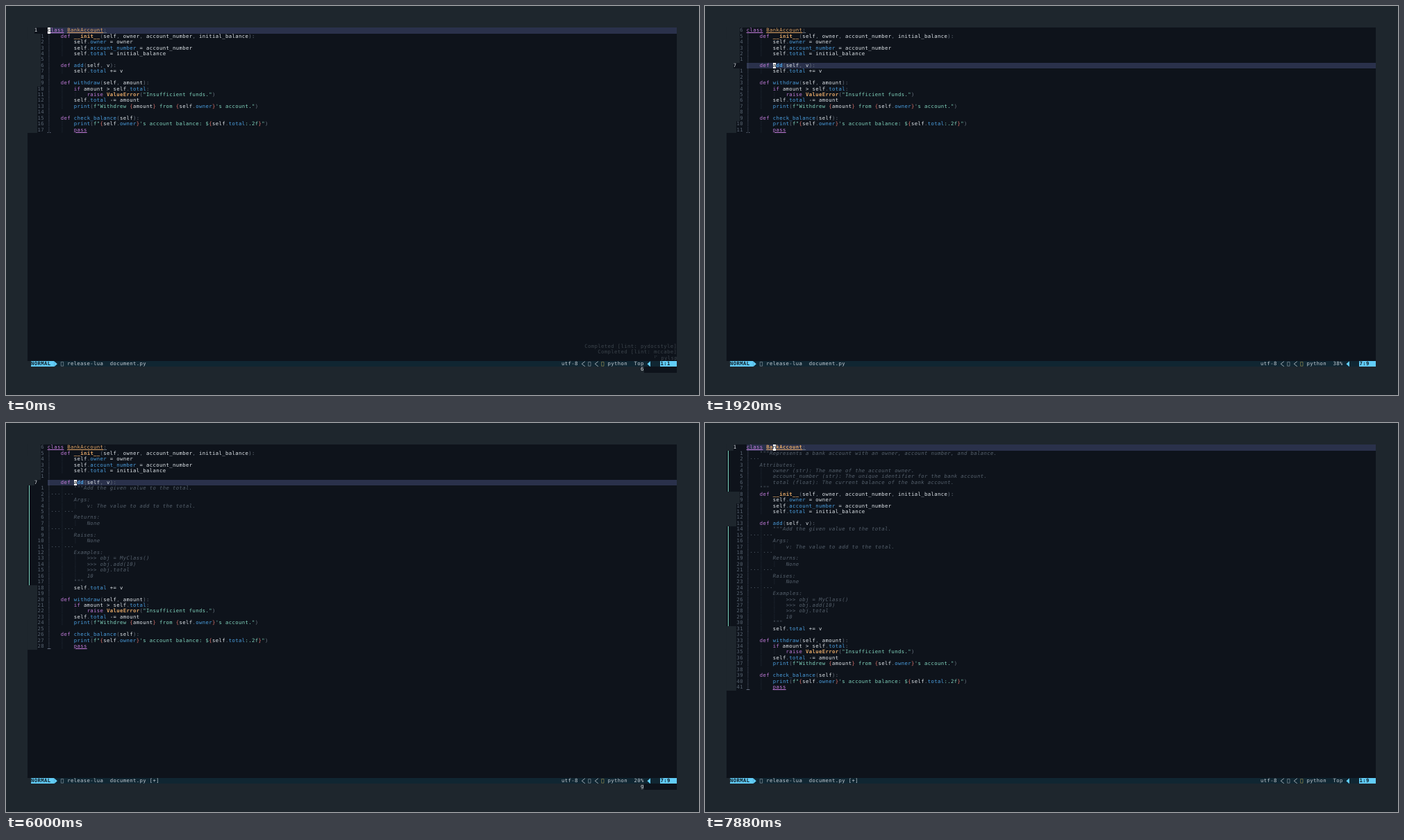
Animation of 998x561 px, one loop 8000 ms. Source, as an HTML page:

```html
<!DOCTYPE html>
<html lang="en">
<head>
<meta charset="utf-8">
<title>Editor session</title>
<style>
html, body { margin: 0; width: 100%; height: 100%; overflow: hidden; background: #1e262d; }
#stage {
  position: relative; width: 998px; height: 561px; overflow: hidden;
  font: 7.25px/8.435px "DejaVu Sans Mono", monospace; letter-spacing: .3813px;
  font-variant-ligatures: none; text-rendering: geometricPrecision; color: #dfe5ea;
  transform: rotate(.001deg); /* keeps baselines and edges on fractional pixels */
}
#stage span, #stage div, #stage svg { position: absolute; white-space: pre; }
#stage svg { left: 0; top: 0; fill: none; }
.bg { background: #0e131b; }
.out { background: #1e262d; }
.line { background: #2a314b; }
.kw { color: #c07bd8; }
.ty { color: #e0a566; }
.bold { font-weight: 700; }
.fn { color: #4b9fe0; }
.pun { color: #69737f; }
.brace { color: #d9736b; }
.str { color: #80d3bd; }
.doc { color: #55606c; font-style: italic; }
.num { color: #596572; }
.guide { color: #2b343f; }
.scope { color: #626a7c; }
.u { text-decoration: underline; text-decoration-thickness: .7px; text-underline-offset: 1px; }
.ref { font-weight: 700; background: color-mix(in srgb, currentColor 28%, #0e131b); }
.cur { background: #fff; color: #0e131b; }
.note { color: #3b434b; }
.sign { background: #7fd6c0; }
.bar { background: #102632; }
.stat { color: #c3ccd4; }
.normal { background: #62cdf8; }
.insert { background: #8be3bd; }
.mode { color: #0e1a22; font-weight: 700; }
.title { color: #d4746a; }
.pick { background: #283041; }
.item { color: #bac3cd; }
.caret { background: #dfe5ea; }
</style>
</head>
<body>
<div id="stage"></div>
<script>
const W = 4.746, H = 8.435, X0 = 31.2, Y0 = 31.2, COLS = 197, LOOP = 8000;
const stage = document.getElementById('stage');
let html = '';

const px = col => X0 + col * W;
const py = row => Y0 + row * H;
const rect = (x, y, w, h, cls, extra = '') => {
  html += `<div class="${cls}" style="left:${x}px;top:${y}px;width:${w}px;height:${h}px;${extra}"></div>`;
};
const fill = (row, col, cols, cls, rows = 1, extra) =>
  rect(px(col), py(row), cols * W, rows * H, cls, extra);
const put = (row, col, text, cls = '') => {
  html += `<span class="${cls}" style="left:${px(col)}px;top:${py(row)}px">${text}</span>`;
};
const outline = (shapes, color, width) => {
  html += `<svg width="998" height="561" stroke="${color}" stroke-width="${width}">${shapes}</svg>`;
};

const base = `class BankAccount:
    def __init__(self, owner, account_number, initial_balance):
        self.owner = owner
        self.account_number = account_number
        self.total = initial_balance

    def add(self, v):
        self.total += v

    def withdraw(self, amount):
        if amount > self.total:
            raise ValueError("Insufficient funds.")
        self.total -= amount
        print(f"Withdrew {amount} from {self.owner}'s account.")

    def check_balance(self):
        print(f"{self.owner}'s account balance: \${self.total:.2f}")
        pass`.split('\n');

// Docstring lines carry a leading "~"
const docLines = (indent, text) =>
  text.split('\n').map(s => '~' + ' '.repeat(indent) + s);
const addDoc = docLines(8, `"""Add the given value to the total.

Args:
    v: The value to add to the total.

Returns:
    None

Raises:
    None

Examples:
    >>> obj = MyClass()
    >>> obj.add(10)
    >>> obj.total
    10
"""`);
const classDoc = docLines(4, `"""Represents a bank account with an owner, account number, and balance.

Attributes:
    owner (str): The name of the account owner.
    account_number (str): The unique identifier for the bank account.
    total (float): The current balance of the bank account.
"""`);
const withAdd = [...base.slice(0, 7), ...addDoc, ...base.slice(7)];
const withBoth = [withAdd[0], ...classDoc, ...withAdd.slice(1)];
const buffers = [base, withAdd, withBoth];

const functionActions = ['Answer Question', 'Complete Code', 'Update Class Docstring',
  'Update Function Docstring', 'Explain Code', 'Update Function Args Type Annotations',
  'Update Function Docstring With Class Context', 'Review Code', 'Write Tests'];
const classActions = ['Answer Question', 'Complete Code', 'Update Class Docstring',
  'Explain Code', 'Review Code', 'Write Tests'];

const lint = ['Completed [lint: pydocstyle]', 'Completed [lint: mccabe]'];
const busy = i => '⠋⠙⠹⠸⠼⠴⠦⠧'[i] + ' pylsp';
const done = '✔ pylsp';

const typed = (times, text) => times.map((t, i) => [t, { prompt: text.slice(0, i) }]);
const steps = [
  [0, { buf: 0, line: 1, col: 1, total: 18, cmd: '6', notes: [...lint, busy(0)],
        ref: '', mod: false, signs: 0, prompt: null, actions: functionActions }],
  [400, { line: 7, cmd: '', notes: [...lint, busy(1)] }],
  [440, { cmd: 'w' }],
  [480, { col: 5, cmd: '', notes: [...lint, busy(2)] }],
  [560, { notes: [...lint, done] }],
  [640, { notes: [done] }],
  [1000, { cmd: 'w' }],
  [1040, { col: 9, cmd: '' }],
  [1080, { ref: 'add' }],
  [1240, { cmd: '&lt;20>' }],
  [1280, { cmd: '&lt;20>c', notes: [] }],
  [1360, { cmd: '' }],
  ...typed([1400, 1600, 1640, 1720, 1760, 1840, 1880], 'Up Fun'),
  [1920, { prompt: null }],
  [3000, { buf: 1 }],
  [3040, { mod: true, total: 35 }],
  [3080, { signs: 1 }],
  [3280, { notes: [busy(0)] }],
  [3360, { notes: [busy(1)] }],
  [3400, { notes: [lint[1], busy(2)] }],
  [3480, { notes: [lint[1], busy(3)] }],
  [3520, { notes: [...lint, busy(4)] }],
  [3600, { notes: [...lint, busy(5)] }],
  [3640, { notes: [...lint, busy(6)] }],
  [3720, { notes: [...lint, done] }],
  [3800, { notes: [lint[0], done] }],
  [3880, { notes: [done] }],
  [5040, { notes: [] }],
  [6000, { cmd: 'g' }],
  [6040, { line: 1, cmd: '', ref: '' }],
  [6080, { ref: 'BankAccount' }],
  [6240, { cmd: '&lt;20>' }],
  [6280, { cmd: '&lt;20>c' }],
  [6360, { cmd: '', actions: classActions }],
  ...typed([6400, 6600, 6640, 6720, 6760, 6840, 6880, 6960, 7040], 'Up Class'),
  [7120, { prompt: null }],
  [7840, { buf: 2 }],
  [7880, { signs: 2 }],
];

const token = /\b(class|def|if|raise|pass)\b|(BankAccount)|(__init__|ValueError)|(print|(?<=def )\w+|(?<=\.)\w+)|([().,:])|(\w+|[^\s\w]+)/g;
const tokenClass = ['kw', 'ty', 'ty bold', 'fn', 'pun', ''];

function putCode(row, col, text, extra, ref, refClass) {
  for (const m of text.matchAll(token)) {
    const cls = tokenClass[m.slice(1).findIndex(Boolean)];
    put(row, col + m.index, m[0], `${cls} ${extra} ${m[0] === ref ? refClass : ''}`);
  }
}

function putString(row, col, text) {
  for (const part of text.split(/({[^}]*})/)) {
    if (part[0] === '{') {
      const [, expr, format = ''] = part.slice(1, -1).match(/^(.*?)(:\.2f)?$/);
      put(row, col, '{', 'brace');
      putCode(row, col + 1, expr, '');
      put(row, col + 1 + expr.length, format, 'str');
      put(row, col + part.length - 1, '}', 'brace');
    } else put(row, col, part, 'str');
    col += part.length;
  }
}

function putLine(row, raw, edge, ref, refClass) {
  const isDoc = raw[0] === '~';
  const text = isDoc ? raw.slice(1) : raw;
  const indent = text.search(/\S|$/);
  const blank = !text.trim();
  for (let c = 0; row && c < Math.max(indent, 1); c += 4) {
    put(row, 6 + c, '┊', c ? 'guide' : edge ? 'scope u' : 'scope');
    if (blank && indent) put(row, 7 + c, '···', 'num');
  }
  if (isDoc) return put(row, 6 + indent, text.slice(indent), 'doc');
  const [, head, str = '', tail = ''] = text.match(/^(.*?)(?:(f?".*")(.*))?$/);
  putCode(row, 6, head, edge ? 'u' : '', ref, refClass);
  putString(row, 6 + head.length, str);
  putCode(row, 6 + head.length + str.length, tail, '');
}

function drawBuffer(s) {
  const lines = buffers[s.buf], open = s.prompt !== null;
  fill(0, 0, COLS, 'bg', 57);
  if (!open) fill(s.line - 1, 6, COLS - 6, 'line');
  const addStart = s.buf === 2 ? 14 : 7;
  const signed = row => (s.signs > 0 && row >= addStart && row < addStart + addDoc.length)
    || (s.signs > 1 && row >= 1 && row <= classDoc.length);
  lines.forEach((text, row) => {
    const here = row === s.line - 1;
    const n = String(here ? s.line : Math.abs(row - s.line + 1));
    const col = here ? 2 : 5 - n.length;
    if (signed(row)) rect(32.8, py(row), 1.5, H + .1, 'sign');
    else fill(row, 0, col, 'out', 1.02);
    put(row, col, n, here && !open ? '' : 'num');
    putLine(row, text, row === 0 || row === lines.length - 1,
      here ? s.ref : '', open ? 'ref' : 'bold');
  });
  if (!open) put(s.line - 1, 5 + s.col, lines[s.line - 1][s.col - 1] || ' ', 'cur');
  s.notes.forEach((note, i) =>
    put(57 - s.notes.length + i, COLS - note.length, note, 'note'));
}

const tofu = (col, color) =>
  outline(`<rect x="${px(col) + .6}" y="${py(57) + 1.4}" width="3.4" height="5.8"/>`, color, .45);
const chevron = col =>
  outline(`<path d="M${px(col) + 5.3} ${py(57) + .6}l-4.6 3.6l4.6 3.6"/>`, '#c3ccd4', .8);

function drawStatus(s) {
  const open = s.prompt !== null, mode = open ? 'insert' : 'normal';
  fill(57, 1, COLS - 1, 'bar');
  fill(57, 1, 7, mode);
  fill(57, 8, 1, mode, 1, 'clip-path:polygon(0 0,100% 50%,0 100%)');
  put(57, 1, mode.toUpperCase(), 'mode');
  tofu(10, '#c3ccd4');
  put(57, 12, 'release-lua', 'stat');
  put(57, 25, open ? '[No Name] [+]' : 'document.py' + (s.mod ? ' [+]' : ''), 'stat');
  if (open) {
    tofu(161, '#c3ccd4');
    chevron(163);
    tofu(165, '#6d7780');
    put(57, 167, 'TelescopePrompt', 'stat');
  } else {
    put(57, 162, 'utf-8', 'stat');
    chevron(168);
    tofu(170, '#c3ccd4');
    chevron(172);
    tofu(174, '#d5bd5c');
    put(57, 176, 'python', 'stat');
  }
  const top = open || s.line === 1;
  put(57, 184, top ? 'Top' : Math.floor(100 * s.line / s.total) + '%', 'stat');
  fill(57, 188, 1, mode, 1, 'clip-path:polygon(100% 0,0 50%,100% 100%)');
  fill(57, 192, 5, mode);
  put(57, 192, open ? '1:' + (3 + s.prompt.length) : s.line + ':' + s.col, 'mode');
  if (s.cmd) {
    fill(58, 187, 10, 'bg');
    put(58, 186, s.cmd);
  }
}

function drawPicker({ prompt, actions }) {
  const words = prompt.toLowerCase().split(' ').filter(Boolean);
  const all = actions.map((name, i) => `${i + 1}: Polyglot: ${name}`);
  const sourceCol = 62 + Math.max(...all.map(a => a.length));
  const shown = all.filter(a => words.every(w => a.toLowerCase().includes(w)));
  const left = px(58.5), width = 79 * W;
  fill(21, 58, 80, 'bg', 15);
  outline(`<rect x="${left}" y="${py(21.5)}" width="${width}" height="${14 * H}" rx="2"/>
    <path d="M${left} ${py(23.5)}h${width}"/>`, '#4b9fe0', .75);
  fill(21, 91, 14, 'bg');
  put(21, 92, 'Code actions', 'title');
  fill(22, 61, 71, 'pick');
  put(22, 59, '>', 'str');
  put(22, 61, prompt, 'bold');
  rect(px(61 + prompt.length), py(22), .8, H, 'caret');
  put(22, 132, `${shown.length} / ${all.length}`, 'num');
  fill(24, 61, 76, 'pick');
  put(24, 59, '>', 'ty');
  const match = words.length ? new RegExp(`(${words.join('|')})`, 'i') : null;
  shown.forEach((text, i) => {
    const row = 24 + i;
    put(row, 61, text.slice(0, 2), 'str');
    let col = 63;
    const parts = match ? text.slice(2).split(match) : [text.slice(2)];
    parts.forEach((part, k) => {
      put(row, col, part, k % 2 ? 'ty bold' : 'item');
      col += part.length;
    });
    put(row, sourceCol, 'polyglot_ls', 'doc');
  });
}

function draw(state) {
  html = '';
  drawBuffer(state);
  drawStatus(state);
  if (state.prompt !== null) drawPicker(state);
  stage.innerHTML = html;
}

const start = performance.now();
let shownStep = 0;
function tick() {
  const t = (performance.now() - start) % LOOP;
  const count = steps.filter(([at]) => at <= t).length;
  if (count !== shownStep) {
    shownStep = count;
    draw(Object.assign({}, ...steps.slice(0, count).map(step => step[1])));
  }
  requestAnimationFrame(tick);
}
tick();
</script>
</body>
</html>
```
